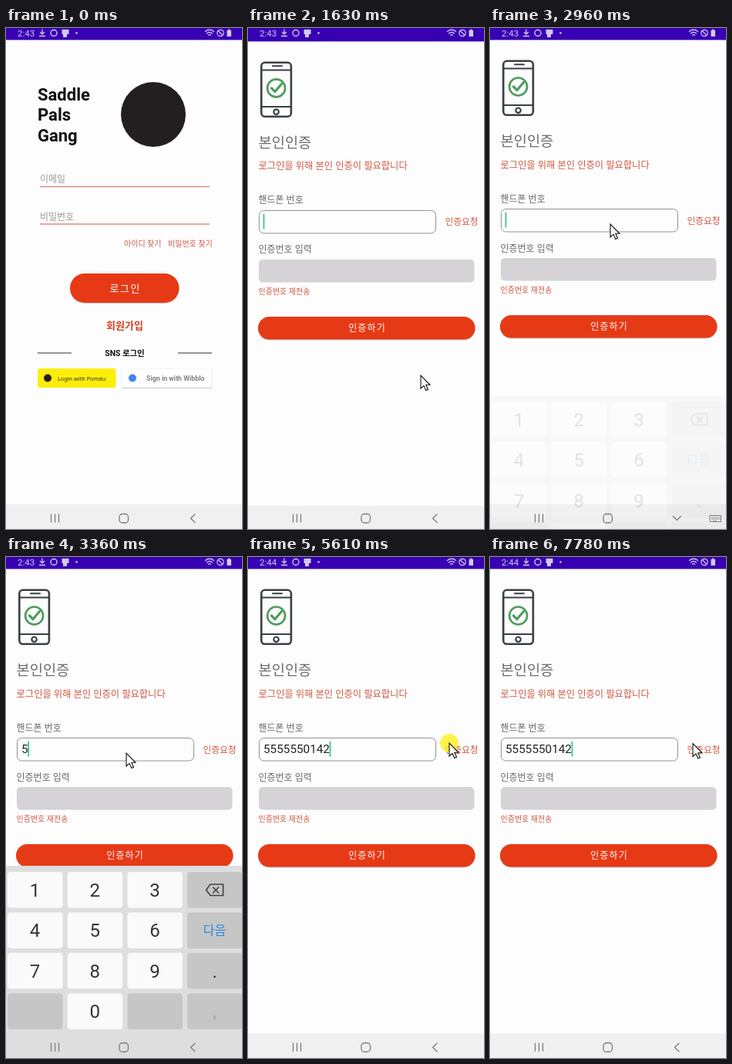
These frames come from a looping animation (306x649 px, 8000 ms). An HTML page:

```html
<!DOCTYPE html>
<html lang="ko">
<head>
<meta charset="utf-8">
<title>로그인</title>
<style>
  html, body { margin: 0; width: 100%; height: 100%; overflow: hidden; background: #000; }
  svg { display: block; width: 306px; height: 649px; }
  text { font-family: Roboto, "Noto Sans CJK KR", "Noto Sans CJK JP", "Noto Sans CJK", sans-serif; white-space: pre; }
  .red { fill: #cf5842; }
  .hint { fill: #9b9b9b; font-size: 12px; }
  .label { fill: #686868; font-size: 12px; }
  .small { font-size: 10px; }
  .line { fill: none; stroke-linecap: round; stroke-linejoin: round; }
</style>
</head>
<body>
<svg viewBox="0 0 306 649">
  <g id="login">
    <rect id="loginPage" width="306" height="654" fill="#fdfdfd"/>
    <rect width="306" height="15.5" fill="#3700b3"/>
    <rect y="617" width="306" height="37" fill="#f0f0f0"/>
    <g font-size="22" font-weight="700" fill="#111">
      <text x="41" y="94">Saddle</text>
      <text x="41" y="120">Pals</text>
      <text x="41" y="146.5">Gang</text>
    </g>
    <circle cx="191" cy="112" r="42" fill="#231f20"/>
    <text class="hint" x="44" y="199.5">이메일</text>
    <text class="hint" x="44" y="248.5">비밀번호</text>
    <path d="M44 205.5H264M44 254H264" stroke="#d9908a" stroke-width="1.3"/>
    <text class="red small" x="153" y="283">아이디 찾기</text>
    <text class="red small" x="210" y="283">비밀번호 찾기</text>
    <rect x="83" y="319" width="141.5" height="38" rx="19" fill="#bbb" opacity=".6"/>
    <rect x="83" y="318" width="141.5" height="38" rx="19" fill="#e63a17"/>
    <text x="154.5" y="342" text-anchor="middle" font-size="13" font-weight="500" letter-spacing="1.4" fill="#fff">로그인</text>
    <text x="154" y="390" text-anchor="middle" font-size="13" font-weight="700" fill="#d4431f">회원가입</text>
    <text x="154" y="425" text-anchor="middle" font-size="10.4" font-weight="700" fill="#111">SNS 로그인</text>
    <path d="M41 421H85M223 421H267" stroke="#333" stroke-width="1.2"/>
    <rect x="41" y="441" width="101.5" height="25" rx="3" fill="#fbee0c"/>
    <circle cx="54" cy="453.5" r="5" fill="#2b1a12"/>
    <text x="67" y="457" font-size="7.3" font-weight="500" fill="#3a2a10" style="font-family:'Noto Sans',sans-serif">Login with Pomdu</text>
    <rect x="150" y="442" width="117" height="25" rx="2" fill="#d4d4d4"/>
    <rect x="150" y="441" width="116.5" height="24.5" rx="2" fill="#fff" stroke="#ececec" stroke-width=".6"/>
    <circle cx="164" cy="453.5" r="5" fill="#4285f4"/>
    <text x="182" y="456.7" font-size="8.8" font-weight="700" fill="#808080">Sign in with Wibblo</text>
  </g>

  <g id="verify">
    <rect y="-3" width="306" height="660" fill="#fdfdfd"/>
    <rect y="-3" width="306" height="18.5" fill="#3700b3"/>
    <rect y="617" width="306" height="40" fill="#f0f0f0"/>
    <g class="line" stroke="#3b4045" stroke-width="2.6">
      <rect x="17.3" y="42.8" width="38.6" height="70" rx="4.5"/>
      <path d="M17.5 52.5H55.500M17.500 100H55.500M32 47.300H44" stroke-width="2"/>
      <circle cx="36.6" cy="106.700" r="3.200" stroke-width="2.200"/>
    </g>
    <g class="line" stroke="#4f9d5e" stroke-width="2.700">
      <circle cx="36.600" cy="76" r="11.500"/>
      <path d="M30.500 76L35 80.500L43.500 70.500" stroke-width="3.200"/>
    </g>
    <text x="13.5" y="153" font-size="18.7" fill="#6d6d6d">본인인증</text>
    <text class="red" x="13.5" y="181.5" font-size="12.3">로그인을 위해 본인 인증이 필요합니다</text>
    <text class="label" x="13.5" y="225.5">핸드폰 번호</text>
    <rect x="14.500" y="234.500" width="229" height="29.500" rx="6" fill="#fdfdfd" stroke="#929292"/>
    <text id="number" x="20" y="254.3" font-size="15.3" fill="#222"></text>
    <rect id="caret" y="239" width="2" height="19.500" fill="#4cc5a8"/>
    <text class="red" x="255.500" y="253.500" font-size="11.7">인증요청</text>
    <text class="label" x="13.5" y="289.5">인증번호 입력</text>
    <rect x="14" y="298" width="279.5" height="29.500" rx="5" fill="#d5d3d6"/>
    <text class="red small" x="13.5" y="343">인증번호 재전송</text>
    <rect x="13" y="373" width="281.500" height="29.500" rx="14.700" fill="#aaa" opacity=".6"/>
    <rect x="13" y="372" width="281.500" height="29.500" rx="14.700" fill="#e63a17"/>
    <text x="154.500" y="391" text-anchor="middle" font-size="12" letter-spacing="1.1" fill="#fff">인증하기</text>
  </g>

  <g id="keyboard">
    <rect y="400" width="306" height="349" fill="#dedede"/>
    <g id="keys" text-anchor="middle" font-size="24" fill="#333"></g>
    <path class="line" d="M265 424H281.500V438.500H265L259.500 431.200ZM268.500 428L275.500 435M275.500 428L268.500 435" stroke="#444" stroke-width="1.7"/>
  </g>

  <g id="status" fill="#d3c9f0" stroke="none">
    <text x="15" y="10.6" font-size="11.5" id="clock"></text>
    <path class="line" d="M47 2V8M44.500 5.500L47 8L49.500 5.500M43.500 10.500H50.500" stroke="#d3c9f0" stroke-width="1.3"/>
    <circle class="line" cx="62" cy="6.500" r="4" stroke="#d3c9f0" stroke-width="1.400"/>
    <path d="M72.500 2H81.500V8H79V12H74V8H72.500Z"/>
    <circle cx="91.500" cy="6.500" r="1.300"/>
    <path class="line" d="M258.500 4.500Q264 0 269.500 4.500M260.500 7Q264 4 267.500 7M262.500 9.200Q264 8 265.500 9.200" stroke="#d3c9f0" stroke-width="1.300"/>
    <path class="line" d="M275 3.500L281 9.500M282.200 6.500A4.200 4.200 0 1 1 273.800 6.500A4.200 4.200 0 1 1 282.200 6.500" stroke="#d3c9f0" stroke-width="1.200"/>
    <path d="M286.500 3H288V1.800H290.500V3H292V11H286.500Z"/>
  </g>

  <g class="line" stroke="#7c7c7c" stroke-width="1.300">
    <path d="M58.500 630V640M63.500 630V640M68.500 630V640"/>
    <rect x="147" y="629.500" width="11.500" height="11.500" rx="3.800"/>
    <path id="back" d="M245 630L239.500 635.300L245 640.500"/>
    <g id="hide">
      <path d="M237.500 632.500L242.500 637.500L247.500 632.500"/>
      <rect x="285.500" y="631.500" width="14" height="8" stroke-width="1"/>
      <path d="M287.500 634H298M287.500 636H298M290 638H295" stroke-dasharray="1 1.500" stroke-width="1"/>
    </g>
  </g>

  <g id="pointer">
    <circle id="press" r="12" fill="#ffee00" opacity=".7"/>
    <path d="M0 0V17L4 13.300L6.800 19.500L9.500 18.300L6.800 12.300H12Z" fill="#fff" stroke="#111" stroke-width="1.100"/>
  </g>
</svg>
<script>
const LOOP = 8000;
const PHONE = "5555550142";
const typedAt = [3320, 3820, 3980, 4140, 4300, 4450, 4600, 4840, 5000, 5150];
const presses = [[990, 1085], [2720, 2805], [5605, 5680]];
// time, x, y
const pointerPath = [
  [250, 278, 655], [760, 224, 450], [2060, 224, 450], [2500, 156, 254],
  [5150, 156, 254], [5560, 261, 241], [5680, 261, 241], [5840, 263, 241.5]
];

const $ = id => document.getElementById(id);
const progress = (t, from, to) => Math.min(1, Math.max(0, (t - from) / (to - from)));
const smooth = p => p * p * (3 - 2 * p);
const show = (id, on) => $(id).style.display = on ? "" : "none";
const move = (id, x, y) => $(id).setAttribute("transform", `translate(${x} ${y})`);

function buildKeys() {
  const labels = ["1", "2", "3", "", "4", "5", "6", "다음", "7", "8", "9", ".", "", "0", "", ","];
  $("keys").innerHTML = labels.map((label, i) => {
    const x = 2 + (i % 4) * 77.7, y = 408 + Math.floor(i / 4) * 52.4;
    const digit = /\d/.test(label), next = label === "다음";
    const color = next ? "#2b86d9" : label === "," ? "#a5a5a5" : "#333";
    return `<rect x="${x}" y="${y}" width="71.5" height="46.5" rx="4" fill="${digit ? "#fafafa" : "#c6c6c6"}"/>` +
      `<text x="${x + 35.500}" y="${y + (next ? 29 : 32)}" font-size="${next ? 16 : 24}" fill="${color}">${label}</text>`;
  }).join("");
}

function pointerAt(t) {
  const i = pointerPath.findIndex(k => k[0] > t);
  if (i < 0) return pointerPath.at(-1).slice(1);
  if (i === 0) return pointerPath[0].slice(1);
  const [t0, x0, y0] = pointerPath[i - 1], [t1, x1, y1] = pointerPath[i];
  const p = smooth(progress(t, t0, t1));
  return [x0 + (x1 - x0) * p, y0 + (y1 - y0) * p];
}

function caretOn(t) {
  if (t < 2720) return (t - 1400 + 1000) % 1000 < 500;
  return t < 5310 || t > 7300 || (t - 5310) % 1000 < 500;
}

function render(t) {
  // New screen slides up and fades in over the login screen
  const opening = progress(t, 1240, 1700);
  show("verify", t >= 1240);
  show("login", t < 1700);
  $("verify").setAttribute("opacity", progress(t, 1225, 1425));
  move("verify", 0, 195 * (1 - opening) ** 2.43);
  move("login", 0, -9 * progress(t, 1240, 1400));
  $("loginPage").setAttribute("fill", t < 1240 ? "#fdfdfd" : "#f4f4f8");

  const typed = typedAt.filter(at => t >= at).length;
  $("number").textContent = PHONE.slice(0, typed);
  $("caret").setAttribute("x", 19.5 + 8.6 * typed);
  show("caret", caretOn(t));
  $("clock").textContent = t < 3820 ? "2:43" : "2:44";

  const rise = progress(t, 2930, 3250), drop = progress(t, 3430, 3590);
  show("keyboard", rise > 0 && drop < 1);
  $("keyboard").setAttribute("opacity", progress(t, 2930, 3170) * (1 - drop));
  move("keyboard", 0, 103 * (1 - rise) ** 3 + 90 * drop * drop);
  const canHide = t >= 2940 && t < 3340;
  show("hide", canHide);
  show("back", !canHide);

  move("pointer", ...pointerAt(t));
  show("press", presses.some(([from, to]) => t >= from && t < to));
}

function frame() {
  render(performance.now() % LOOP);
  requestAnimationFrame(frame);
}

buildKeys();
frame();
</script>
</body>
</html>
```
